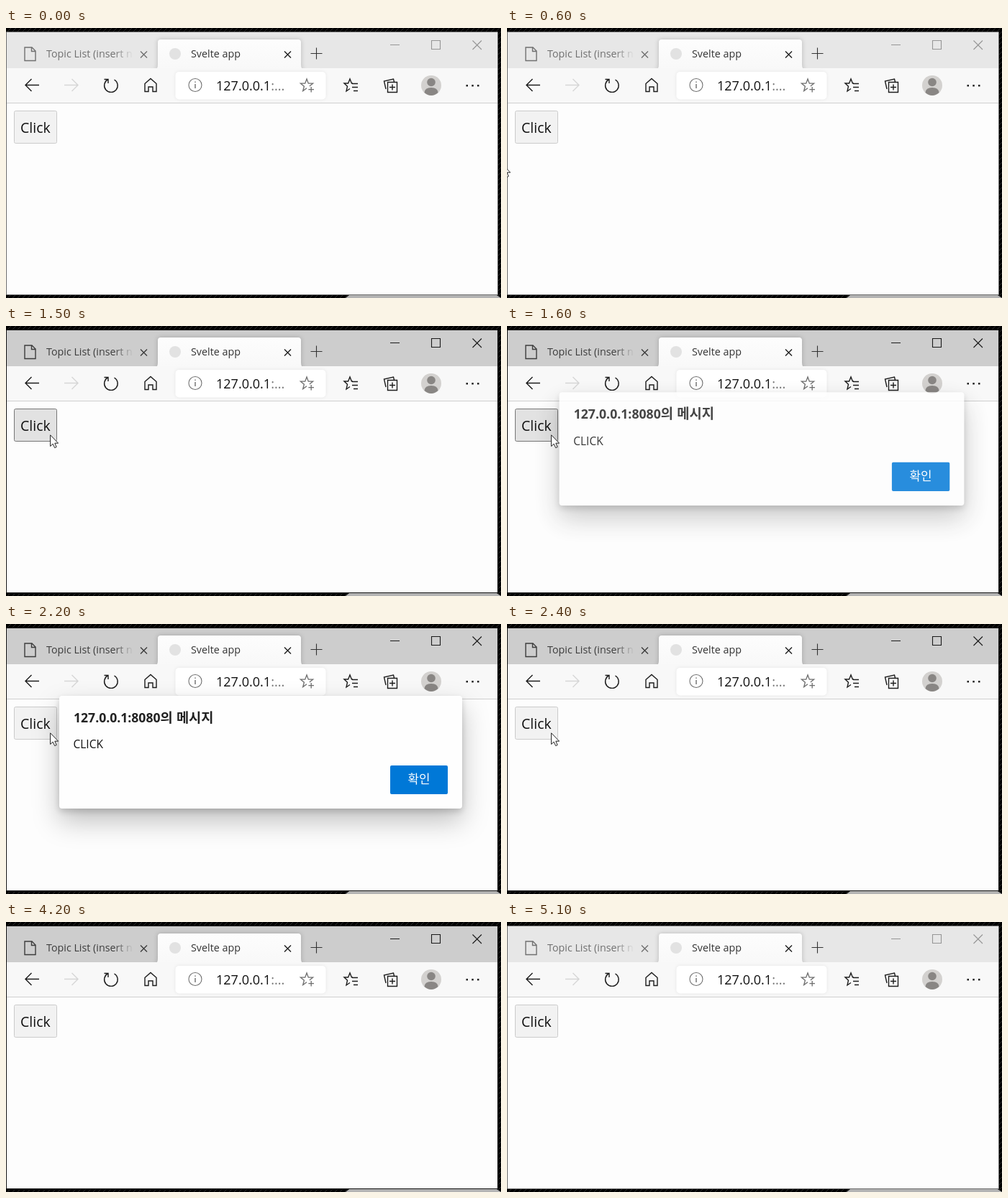
Recreate the animation shown at these times as an HTML page. Size 688 by 376 pixels, loop 5200 ms.

```html
<!DOCTYPE html>
<html lang="ko">
<head>
<meta charset="utf-8">
<title>Svelte app</title>
<style>
  html, body { margin: 0; width: 100%; height: 100%; overflow: hidden; background: #000; }
  svg { display: block; width: 100vw; height: 100vh; font-family: "Open Sans", "Noto Sans CJK KR", "Noto Sans CJK JP", sans-serif; }
  .icon { fill: none; stroke: #1c1c1c; stroke-width: 1.4; }
  .thin { stroke-width: 1.1; }
  .gray { stroke: #6e6e6e; }
  .bar { fill: #e7e7e7; }
  .frame { fill: none; stroke: #6f6f6f; }
  .controls { stroke: #969696; }
  .idle { color: #707070; }
  .active .bar { fill: #cdcdcd; }
  .active .frame { stroke: #141414; }
  .active .controls { stroke: #1a1a1a; }
  .active .idle { color: #3c3c3c; }
  #tab { filter: drop-shadow(0 0 3px rgba(0, 0, 0, .2)); }
  #address { filter: drop-shadow(0 0 2px rgba(0, 0, 0, .08)); }
  #button { fill: #f2f2f2; stroke: #cbcbcb; }
  #button.pressed { fill: #e2e2e2; stroke: #767676; }
  #panel { filter: drop-shadow(0 4px 5px rgba(0, 0, 0, .17)) drop-shadow(0 17px 18px rgba(0, 0, 0, .24)); }
  .hangul { font-family: "Noto Sans CJK KR", "Noto Sans CJK JP", sans-serif; }
</style>
</head>
<body>
<svg viewBox="0 0 688 376">
  <defs>
    <pattern id="hatch" width="7" height="7" patternUnits="userSpaceOnUse">
      <path d="M-1 8 8-1M-1 1 1-1M6 8 8 6" stroke="#2a2a2a"/>
    </pattern>
    <linearGradient id="fade" gradientUnits="userSpaceOnUse" x1="150" x2="177">
      <stop stop-color="#fff"/><stop offset="1" stop-color="#fff" stop-opacity="0"/>
    </linearGradient>
    <mask id="fadeMask"><path d="M40 16H178V56H40Z" fill="url(#fade)"/></mask>
    <linearGradient id="tabFill" x2="0" y2="1">
      <stop stop-color="#fdfdfd"/><stop offset="1" stop-color="#f8f8f8"/>
    </linearGradient>
    <clipPath id="tabArea"><path d="M1 6H683V56H1Z"/></clipPath>
  </defs>

  <rect width="688" height="376"/>
  <rect width="688" height="376" fill="url(#hatch)"/>
  <path d="M472 376 477 372H682L688 376Z" fill="#b2b2b2"/>

  <g id="window">
    <path d="M1 6H683V371H1Z" fill="#fdfdfd"/>
    <path class="bar" d="M1 6H683V56H1Z"/>
    <g clip-path="url(#tabArea)">
      <path id="tab" d="M206 60Q211 58 211 51V20Q211 16 215 16H406Q410 16 410 20V51Q410 58 415 60Z" fill="url(#tabFill)"/>
    </g>
    <path d="M1 56H683V104H1Z" fill="#f8f8f8"/>
    <path d="M1 104.5H683" stroke="#cfcfcf"/>
    <path class="frame" d="M.5 5.5H683.5V371.5H.5Z"/>

    <!-- tabs -->
    <g class="idle">
      <path class="icon" style="stroke:currentColor" d="M26 27H36L41 32V45.5H26ZM35.5 27V32.5H41"/>
      <path class="icon" style="stroke:currentColor" d="m187 32.500 9 9m0-9-9 9"/>
      <text x="56" y="41" font-size="14.3" fill="currentColor" mask="url(#fadeMask)">Topic List (insert n</text>
    </g>
    <circle cx="235" cy="36" r="8" fill="#e2e2e2"/>
    <text x="257" y="41" font-size="14.3" fill="#333">Svelte app</text>
    <path class="icon" d="m387 32.5 9 9m0-9-9 9"/>
    <path class="icon thin" style="stroke:#333" d="M423.5 35.5H439.5M431.5 27.5V43.5"/>
    <path class="icon thin controls" d="M534 23.5H547M591.5 17.5H603.5V29.5H591.5ZM648.5 17.5l12.5 12.5m0-12.5-12.5 12.5"/>

    <!-- toolbar -->
    <path class="icon" d="M46 79.5H27M35.5 71 27 79.5l8.5 8.5"/>
    <path class="icon" style="stroke:#d6d6d6" d="M81 79.5H100M91.5 71l8.5 8.5-8.5 8.5"/>
    <path class="icon" d="M141 72.2A9.3 9.3 0 1 0 150.5 72M136.5 71.5H142V77"/>
    <path class="icon" d="M193 77.5 201 70.500l8 7V88.500H204V82H198V88.500H193Z"/>
    <rect id="address" x="235.5" y="61" width="209" height="38.5" rx="5" fill="#fff"/>
    <circle class="icon gray thin" cx="263" cy="79.5" r="9"/>
    <path class="icon gray" d="M263 78V84M263 74.5V76"/>
    <text x="292" y="87" font-size="18" fill="#111">127.0.0.1<tspan fill="#777">:...</tspan></text>
    <path class="icon gray" transform="translate(418 80) scale(.95)" d="M4 1 9-3H2.4L0-9.5-2.4-3H-9L-3.8 1.2-5.6 8 0 4M2.500 6H10.5M6.5 2V10"/>
    <path class="icon" transform="translate(478 80)" d="M4-3H2.4L0-9-2.4-3H-8L-3.5 1.2-5 8 0 4.5M3-2.5H11M3 2.5H11M5 7.5H11"/>
    <path class="icon" d="M530.5 75.5H543.5V89.5H530.5ZM528 85 525.5 74 538.5 71 539.5 75M537 78.5V86.5M533 82.5H541"/>
    <circle cx="591" cy="80" r="14" fill="#d3d1cf"/>
    <circle cx="591" cy="75.5" r="5.8" fill="#898684"/>
    <path d="M581.5 90Q582 83 591 83T600.5 90Q591 98 581.5 90Z" fill="#898684"/>
    <path d="M639.5 79H642V81.5H639.5ZM647.3 79H649.8V81.5H647.3ZM655 79H657.5V81.5H655Z" fill="#222"/>

    <!-- page -->
    <rect id="button" x="11.5" y="115.5" width="59" height="45" rx="2"/>
    <text x="20" y="146" font-size="19.5" fill="#111">Click</text>
  </g>

  <g id="dialog">
    <rect id="panel" x="74" y="100" width="560" height="157" rx="4" fill="#fefefe"/>
    <text x="94" y="137" font-size="17.6" font-weight="700" fill="#222">127.0.0.1:8080<tspan class="hangul" font-size="18.7">의 메시지</tspan></text>
    <text x="93.5" y="173" font-size="15.5" fill="#111">CLICK</text>
    <rect x="534" y="197" width="80" height="40" rx="2" fill="#0078d7"/>
    <text class="hangul" x="574" y="222" font-size="16.8" fill="#fff" text-anchor="middle">확인</text>
  </g>

  <path id="cursor" d="M.6.8V16.5L4.2 13.2 6.7 18.6 9.2 17.5 6.8 12.2H11.6Z" fill="#fff" stroke="#222"/>
</svg>
<script>
  const LOOP = 5200;
  const [win, button, dialog, cursor] =
    ["window", "button", "dialog", "cursor"].map(id => document.getElementById(id));

  // Each row: start time, then the values held until the next row.
  const cursorSteps = [
    [0], [200, 589, 139], [300, 520, 141], [400, 310, 209], [500, 105, 174],
    [600, -7, 189], [700, 50, 179], [800, 53, 172], [900, 57, 162],
    [1000, 60, 154], [1100, 61, 151],
    [3900, 201, 147], [4000, 447, 241], [4100, 489, 144], [4200]
  ];
  // start, opacity, vertical offset, scale
  const dialogSteps = [
    [0, 0, 0, 1], [1600, .84, -7.3, 1.005], [1700, 1, 0, 1],
    [2300, .35, -12, 1], [2400, 0, 0, 1]
  ];

  const stepAt = (steps, t) => steps.filter(step => step[0] <= t).pop();
  const between = (t, from, to) => t >= from && t < to;

  function draw() {
    const t = performance.now() % LOOP;
    win.classList.toggle("active", between(t, 1500, 5100));
    button.classList.toggle("pressed", between(t, 1500, 2200));

    const [, opacity, shift, scale] = stepAt(dialogSteps, t);
    dialog.setAttribute("opacity", opacity);
    dialog.setAttribute("transform",
      `translate(354 ${178.5 + shift}) scale(${scale}) translate(-354 -178.5)`);

    const [, x, y] = stepAt(cursorSteps, t);
    cursor.setAttribute("visibility", x === undefined ? "hidden" : "visible");
    if (x !== undefined) cursor.setAttribute("transform", `translate(${x} ${y})`);
    requestAnimationFrame(draw);
  }
  draw();
</script>
</body>
</html>
```
